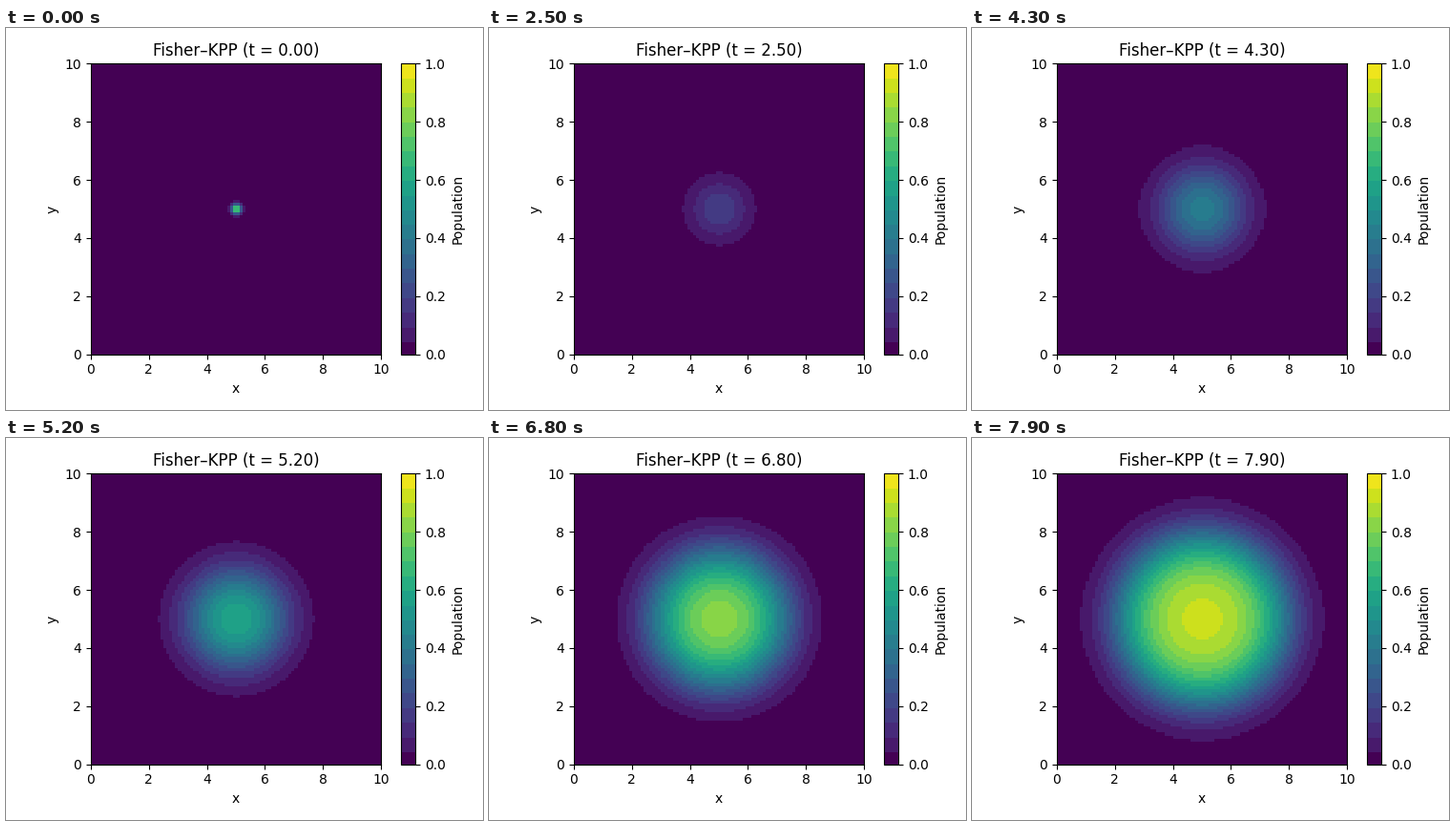
Write a matplotlib script that moves like this. It is 500x400 px and loops after 8000 ms.

```python
import numpy as np
import matplotlib.pyplot as plt
from matplotlib.animation import FuncAnimation
from matplotlib.colors import ListedColormap

plt.rcParams["font.family"] = "DejaVu Sans"

SIZE, N = 10.0, 100
D, R = 0.1, 1.0
DT, STRIDE = 0.01, 10
FRAMES = 80


def laplacian(u, dx):
    around = sum(np.roll(u, s, axis) for s in (1, -1) for axis in (0, 1))
    return (around - 4 * u) / dx**2


def simulate():
    """Explicit Euler for u_t = D lap(u) + R u (1 - u)."""
    x = np.linspace(0, SIZE, N)
    dx = x[1] - x[0]
    X, Y = np.meshgrid(x, x)
    u = np.exp(-((X - SIZE / 2) ** 2 + (Y - SIZE / 2) ** 2) / 0.02)
    fields = []
    for n in range((FRAMES - 1) * STRIDE + 1):
        u = u + DT * (D * laplacian(u, dx) + R * u * (1 - u))
        if n % STRIDE == 0:
            fields.append(u)
    return fields


def banded_viridis(entries=1000):
    """Viridis reduced to twenty flat bands."""
    edges = np.linspace(0.042, 0.95, 19)
    mids = np.concatenate([[0], (edges[:-1] + edges[1:]) / 2, [0.975]])
    values = (np.arange(entries) + 0.5) / entries
    return ListedColormap(plt.get_cmap("viridis")(mids[np.searchsorted(edges, values)]))


def caption(i):
    return f"Fisher–KPP (t = {i * STRIDE * DT:.2f})"


fields = simulate()

fig, ax = plt.subplots(figsize=(5, 4), dpi=100)
image = ax.imshow(fields[0], cmap=banded_viridis(), vmin=0, vmax=1, origin="lower",
                  extent=[0, SIZE, 0, SIZE], interpolation="nearest")
fig.colorbar(image, ax=ax, label="Population")
ax.set_xlabel("x")
ax.set_ylabel("y")
title = ax.set_title(caption(0))
fig.tight_layout()


def update(i):
    image.set_data(fields[i])
    title.set_text(caption(i))
    return image, title


anim = FuncAnimation(fig, update, frames=FRAMES, interval=100, repeat=True, repeat_delay=0)
plt.show()
```
